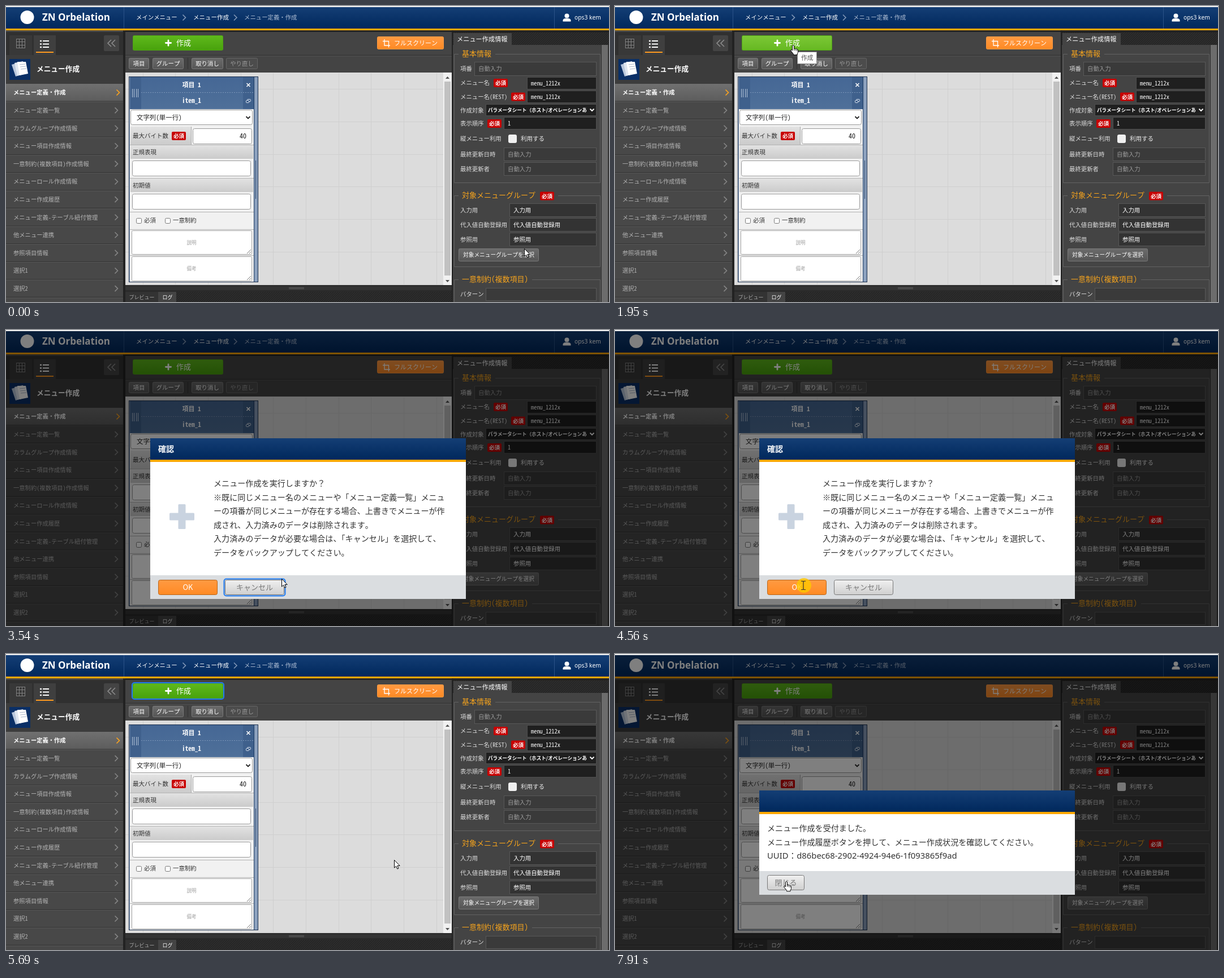
Animation of 1066x525 px, one loop 8000 ms. Source, as an HTML page:

```html
<!DOCTYPE html>
<html lang="ja">
<head>
<meta charset="utf-8">
<title>メニュー作成</title>
<style>
html, body { margin: 0; width: 100%; height: 100%; overflow: hidden; background: #333; }
svg { display: block; width: 1066px; height: 525px; }
text { font-family: "Noto Sans Mono CJK JP", "Noto Sans CJK JP", "Noto Sans CJK", "Noto Sans", monospace; white-space: pre; }
.latin { font-family: "Noto Sans", "Noto Sans CJK JP", sans-serif; }
.narrow { font-family: "Noto Sans CJK JP", "Noto Sans CJK", sans-serif; }
</style>
</head>
<body>
<svg id="stage" viewBox="0 0 1066 525" xmlns="http://www.w3.org/2000/svg"></svg>
<script>
const LOOP = 8000;
const stage = document.getElementById('stage');

// Drawing helpers; boxes are given by their edges, text by its vertical centre.
const box = (x1, y1, x2, y2, fill, extra = '') =>
  `<rect x="${x1}" y="${y1}" width="${x2 - x1}" height="${y2 - y1}" fill="${fill}" ${extra}/>`;
const frame = (x1, y1, x2, y2, fill, stroke, r = 2) =>
  box(x1 + .5, y1 + .5, x2 - .5, y2 - .5, fill, `stroke="${stroke}" rx="${r}"`);
const text = (x, y, str, size, fill, extra = '') =>
  `<text x="${x}" y="${(y + size * .37).toFixed(2)}" font-size="${size}" fill="${fill}" ${extra}>${str}</text>`;
const line = (d, stroke, width = 1, extra = '') =>
  `<path d="${d}" fill="none" stroke="${stroke}" stroke-width="${width}" ${extra}/>`;
const MID = 'text-anchor="middle"';
const BOLD = 'font-weight="700"';
const chevron = (x, y, color, s = 5) => line(`M${x - s / 2} ${y - s}l${s} ${s}l${-s} ${s}`, color, 1.6);
const caret = (x, y, color) => line(`M${x - 3.5} ${y - 2}l3.5 3.5l3.5 -3.5`, color, 1.8);
const badge = (x, y) => box(x, y - 7.5, x + 25, y + 7.5, '#c80000', 'rx="2"') +
  text(x + 12.5, y, '必須', 9.6, '#fff', MID + ' ' + BOLD);
const plus = (x, y, r, w, fill) =>
  box(x - r, y - w / 2, x + r, y + w / 2, fill, 'rx="1.5"') + box(x - w / 2, y - r, x + w / 2, y + r, fill, 'rx="1.5"');
const grad = (id, a, b) => `<linearGradient id="${id}" x2="0" y2="1"><stop stop-color="${a}"/>` +
  `<stop offset="1" stop-color="${b}"/></linearGradient>`;

const defs = () => '<defs>' +
  grad('navy', '#143e75', '#00285c') + grad('green', '#5fb91c', '#48a20c') + grad('greenHot', '#7cc836', '#66b822') +
  grad('btn', '#6b6b6b', '#565656') + grad('active', '#707070', '#5c5c5c') + grad('head', '#456795', '#4f7099') +
  grad('row', '#e2e2e2', '#cbcbcb') + grad('light', '#f0f0f0', '#cfcfcf') + grad('orange', '#ff9a42', '#ff8a24') +
  '<pattern id="weave" width="4" height="4" patternUnits="userSpaceOnUse">' +
  box(0, 0, 4, 4, '#262626') + line('M-1 1l2-2M0 4l4-4M3 5l2-2', '#333') + '</pattern></defs>';

function header() {
  return box(0, 0, 1066, 2, '#f2f2f2') + box(0, 2, 1066, 40, 'url(#navy)') + box(0, 40, 1066, 43.5, '#ffa800') +
    box(208, 2, 209, 40, '#2b5288') + box(969, 2, 970, 40, '#2b5288') +
    '<circle cx="37.500" cy="20" r="12" fill="#fff"/>' +
    text(64, 20, 'ZN Orbelation', 17, '#fff', 'class="latin" ' + BOLD) +
    text(230, 20, 'メインメニュー', 10.4, '#fff') + chevron(315, 20.5, '#8298b8') +
    text(331, 20, 'メニュー作成', 10.5, '#fff') + chevron(405.5, 20.5, '#8298b8') +
    text(421, 20, 'メニュー定義・作成', 10.4, '#aebdd3') +
    '<circle cx="991.500" cy="17.500" r="4" fill="#fff"/><path d="M984.500 27.500v-2q0-3 4-3.500h6q4 .5 4 3.500v2z" fill="#fff"/>' +
    text(1005, 20, 'ops3 kem', 10.3, '#fff', 'class="latin"');
}

function sidebar() {
  const items = ['メニュー定義・作成', 'メニュー定義一覧', 'カラムグループ作成情報', 'メニュー項目作成情報',
    '一意制約(複数項目)作成情報', 'メニューロール作成情報', 'メニュー作成履歴', 'メニュー定義-テーブル紐付管理',
    '他メニュー連携', '参照項目情報', '選択1', '選択2'];
  let s = box(0, 43.5, 208, 525, '#484848') + box(0, 46, 208, 87, '#303030') + box(0, 87, 208, 138, '#3c3c3c') +
    box(6, 52, 46, 87, '#383838') + box(49, 52, 88, 87, '#3f3f3f') + box(53, 81, 84, 83, '#ff9a1f') +
    frame(18, 58, 34, 75, 'none', '#808080', 0) +
    line('M18 63.500H34M18 69.500H34M23.500 58V75M28.500 58V75', '#808080');
  for (const y of [62, 67.5, 73]) s += box(60, y - 1.2, 63, y + 1.2, '#fff') + box(65, y - 1, 76, y + 1, '#fff');
  s += box(173, 52, 200, 80, '#444', 'rx="2"') + line('M186 60l-6 6l6 6M193 60l-6 6l6 6', '#8f8f8f', 1.5) +
    box(6, 94, 43, 131, '#0a2f66') +
    '<path d="M10 104l14-4l7 20l-14 5z" fill="#b9c7dc"/><path d="M15 101l15-3l5 22l-15 4z" fill="#dfe6f0"/>' +
    '<path d="M20 99h15l4 21l-15 3z" fill="#fff"/>' + line('M24 104l10-1M25 108l10-1M26 112l10-1', '#a9b6ca') +
    text(54, 111.5, 'メニュー作成', 12.7, '#fff', BOLD);
  items.forEach((name, i) => {
    const y = 153.5 + i * 31.6, on = i === 0;
    if (on) s += box(0, 138, 208, 169, 'url(#active)');
    s += box(0, y + 15, 208, y + 16, '#2e2e2e') + box(0, y + 16, 208, y + 17, '#5a5a5a') +
      text(13, y, name, 10.3, on ? '#fff' : '#b4b4b4', on ? BOLD : '') + chevron(on ? 198 : 195, y, on ? '#ffa41c' : '#858585');
  });
  return s + box(207, 43.5, 211, 525, '#222');
}

function toolbar() {
  const button = (x1, x2, label, off) => frame(x1, 92, x2, 112, off ? '#4c4c4c' : 'url(#btn)', off ? '#666' : '#7a7a7a') +
    text((x1 + x2) / 2, 102, label, 10.4, off ? '#999' : '#fff', MID);
  return box(211, 43.5, 788, 525, '#444') + box(211, 43.5, 788, 46, '#222') + box(211, 87, 788, 88, '#2c2c2c') +
    box(211, 88, 788, 89, '#565656') + box(321, 92, 322, 112, '#333') +
    button(217, 253, '項目') + button(259, 314, 'グループ') + button(328, 384, '取り消し') + button(389, 445, 'やり直し', true) +
    frame(656, 54, 774, 77, 'url(#orange)', '#ff9a42') +
    line('M669 59v11h10M666 62.500h10.500v11', '#fff', 1.3) + text(686, 66, 'フルスクリーン', 11, '#fff');
}

function canvas() {
  let s = box(211, 118, 788, 495, '#dcdcdc'), d = '';
  for (let x = 241.5; x < 773; x += 57.7) d += `M${Math.round(x) + .5} 119V495`;
  for (let y = 147; y < 495; y += 57.8) d += `M211 ${Math.round(y) + .5}H773`;
  s += line(d, '#cfcfcf') + box(773, 118, 788, 495, '#f1f1f1') + box(775, 134, 786, 478, '#c1c1c1') +
    '<path d="M777 129l3.500-4l3.500 4zM777 486l3.500 4l3.500-4z" fill="#505050"/>';
  return s + box(211, 495, 788, 525, '#2a2a2a') + box(211, 497, 788, 504, '#343434') +
    line('M500 499.500H527M500 501.500H527', '#5c5c5c') + box(301, 507, 788, 525, 'url(#weave)') +
    box(211, 507, 269, 525, '#333') + box(269, 507, 301, 525, '#444') +
    text(240, 517, 'プレビュー', 9, '#aaa', MID) + text(285.5, 517, 'ログ', 9, '#fff', MID);
}

function card() {
  const band = (y1, y2, label) => box(220, y1, 437, y2, 'url(#row)') + text(224, (y1 + y2) / 2, label, 10.5, '#333');
  const input = (x1, y1, x2, y2) => frame(x1, y1, x2, y2, '#fff', '#999', 3);
  const area = (y1, y2, label) => frame(222, y1, 435, y2, '#fff', '#a6a6a6') +
    text(328, (y1 + y2) / 2, label, 8.6, '#bdbdbd', MID + ' ' + BOLD) +
    line(`M426 ${y2 - 2}l7-7M430 ${y2 - 2}l3-3`, '#777');
  const check = (x, label) => frame(x, 376, x + 10, 386, '#fff', '#777') + text(x + 14, 380.5, label, 10.4, '#333');
  return frame(217, 125, 446, 490, '#8ba0bd', '#1b2f4d', 0) + box(219, 126, 438, 183, 'url(#head)') +
    box(219, 126, 239, 183, '#3f608c') + box(419, 126, 438, 183, '#3f608c') +
    line('M239 153.500H438', '#7c96b8', 1, 'stroke-dasharray="2 2"') +
    line('M223.500 147V162M226.500 147V162M230.500 147V162M233.500 147V162', '#b5c5da') +
    text(328, 140, '項目 1', 11, '#fff', MID + ' ' + BOLD) + text(328, 168, 'item_1', 11.3, '#fff', MID + ' ' + BOLD) +
    line('M425.500 137l6 6m0-6l-6 6', '#fff', 1.6) + frame(426, 165, 433, 170, 'none', '#dfe7f2', 1) +
    frame(424, 167, 430, 172, '#3f608c', '#dfe7f2', 1) +
    box(219, 183, 438, 489, '#f1f1f1') + box(438, 126, 439, 489, '#1b3960') + line('M441.500 274V342', '#2a4468') +
    input(220, 184, 436, 211) + text(231, 198, '文字列(単一行)', 11.4, '#222') + caret(428, 198, '#222') +
    box(220, 214, 327, 246, 'url(#row)') + box(327, 214, 328, 246, '#aaa') + text(224, 230, '最大バイト数', 10.5, '#333') +
    badge(293, 230.5) + input(330, 217, 435, 245) + text(425, 231, '40', 12, '#111', 'text-anchor="end"') +
    band(247, 271, '正規表現') + input(223, 274, 433, 302) + band(306, 330, '初期値') + input(223, 333, 433, 361) +
    line('M219 246.500H438M219 305.500H438M219 365.500H438M219 396.500H438M219 442.500H438', '#b4b4b4') +
    check(230, '必須') + check(281, '一意制約') + area(398, 441, '説明') + area(444, 488, '備考');
}

function panel() {
  const label = (y, s) => text(803, y, s, 10.4, '#ddd');
  const field = (x, y1, y2, value = '', look = 'dark') => {
    const [fill, stroke, ink] = { dark: ['#1f1f1f', '#4e4e4e', '#fff'], auto: ['#3a3a3a', '#585858', '#989898'],
      view: ['#333', '#565656', '#fff'] }[look];
    return frame(x, y1, 1044, y2, fill, stroke, 0) + text(x + 7, (y1 + y2) / 2, value, 10.4, ink);
  };
  const group = (y, end, title, gap) => line(`M800 ${y}.5H792.5V${end}.5H1050.5V${y}.5H${gap}`, '#636363') +
    text(806, y - .5, title, 13, '#f5a31d');
  let s = box(788, 43.5, 1066, 525, '#444') + box(788, 43.5, 1066, 69, 'url(#weave)') + box(788, 43.5, 1066, 47, '#222') +
    box(788, 43.5, 790, 525, '#222') + box(791, 48, 894, 70, '#444') + text(797, 58.5, 'メニュー作成情報', 11.2, '#fff') +
    box(1052, 69, 1066, 525, '#333') + box(1053, 69, 1064, 525, '#6c6c6c');
  s += group(85, 313, '基本情報', 865) +
    label(111, '項番') + field(828, 99, 124, '自動入力', 'auto') +
    label(136, 'メニュー名') + badge(862, 136.5) + field(921, 126, 148, 'menu_1212x') +
    label(161, 'メニュー名(REST)') + badge(893, 161) + field(921, 150, 172, 'menu_1212x') +
    label(185, '作成対象') + field(848, 174, 195) +
    text(852, 185, 'パラメータシート（ホスト/オペレーションあ', 8.6, '#fff', 'class="narrow" ' + BOLD) + caret(1036, 184.5, '#fff') +
    label(208, '表示順序') + badge(851, 208.5) + field(880, 197, 219, '1') +
    label(235, '縦メニュー利用') + box(888, 228, 903, 243, '#f0f0f0', 'rx="3"') + text(910, 235, '利用する', 10.5, '#eee') +
    label(263, '最終更新日時') + field(880, 251, 275, '自動入力', 'auto') +
    label(289, '最終更新者') + field(880, 277, 301, '自動入力', 'auto');
  s += group(336, 462, '対象メニューグループ', 976) + badge(944, 337);
  ['入力用', '代入値自動登録用', '参照用'].forEach((name, i) => {
    s += label(362 + i * 26, name) + field(890, 350 + i * 26, 374 + i * 26, name, 'view');
  });
  return s + frame(800, 430, 942, 453, 'url(#btn)', '#7a7a7a') + text(871, 441.5, '対象メニューグループを選択', 9.7, '#fff', MID) +
    group(485, 540, '一意制約(複数項目)', 930) + label(511, 'パターン') + field(848, 500, 523, '', 'auto');
}

const createButton = hot => frame(224, 52, 384, 79, `url(#${hot ? 'greenHot' : 'green'})`, '#4f9f17') +
  plus(287, 65.5, 6, 2.8, '#fff') + text(301, 65.5, '作成', 13, '#fff');
const ring = (x1, y1, x2, y2) => box(x1, y1, x2, y2, 'none', 'rx="4" stroke="#1f7bf2" stroke-width="2"');

// Dialogs are drawn at full size and scaled about the middle of the stage.
const dialog = (top, bottom, scale, content) =>
  `<g transform="translate(534 334.5) scale(${scale}) translate(-534 -334.5)">` +
  box(255, top, 813, bottom, '#fff') + box(255, top, 813, top + 38, 'url(#navy)') + box(255, top + 38, 813, top + 42, '#ffa800') +
  box(255, bottom - 42, 813, bottom, '#dadde0') + content + '</g>';
const dialogButton = (x1, y1, x2, y2, label, fill, ink, stroke) => frame(x1, y1, x2, y2, fill, stroke, 3) +
  text((x1 + x2) / 2, (y1 + y2) / 2, label, 13, ink, MID + ' class="narrow"');

function confirmDialog(scale, ready, focus) {
  const lines = ['メニュー作成を実行しますか？', '※既に同じメニュー名のメニューや「メニュー定義一覧」メニュ',
    'ーの項番が同じメニューが存在する場合、上書きでメニューが作', '成され、入力済みのデータは削除されます。',
    '入力済みのデータが必要な場合は、「キャンセル」を選択して、', 'データをバックアップしてください。'];
  return dialog(192, 477, scale, text(269, 210.5, '確認', 14, '#fff', BOLD) + plus(311, 331, 22, 13, '#c9d3e0') +
    lines.map((s, i) => text(367, 272 + i * 24.5, s, 14.1, '#333')).join('') +
    (ready ? dialogButton(269, 443, 374, 470, 'OK', 'url(#orange)', '#fff', '#b8651a')
      : dialogButton(269, 443, 374, 470, 'OK', '#d5d7d9', '#b9bbbd', '#d0d2d4')) +
    dialogButton(387, 443, 492, 470, 'キャンセル', 'url(#light)', '#777', '#777') +
    (focus ? ring(385.5, 441.5, 493.5, 471.5) : ''));
}

function acceptedDialog(scale, ready, focus) {
  return dialog(242, 427, scale, text(269, 309, 'メニュー作成を受付ました。', 14.1, '#333') +
    text(269, 333.5, 'メニュー作成履歴ボタンを押して、メニュー作成状況を確認してください。', 14.1, '#333') +
    text(269, 358, 'UUID：d86bec68-2902-4924-94e6-1f093865f9ad', 14.8, '#333', 'class="latin"') +
    dialogButton(269, 392, 335, 419, '閉じる', 'url(#light)', ready ? '#777' : '#999', '#777') +
    (focus ? ring(267.5, 390.5, 336.5, 420.5) : ''));
}

const pointers = {
  arrow: '<path d="M.5.500V14.200L3.600 11.300L5.800 16.200L8 15.200L5.900 10.500H10.200Z" fill="#fff" stroke="#000"/>',
  hand: '<path d="M-1.500 1.500q1.500-2 3 0v5.500q1.500-1 2.500.3q1.500-.8 2.500.5q2-.5 2 1.700v3q0 2-1.500 3.500v1.800h-6.500v-1.500' +
    'l-5-6.300q0-2 2-1.200l1 1.200z" fill="#fff" stroke="#000"/>' + line('M1.500 7v3M4 8v2.500M6.500 8.500v2.500', '#000', .8),
  beam: line('M-4-7.500h3l1 1l1-1h3M0-6.500V6.500M-4 7.500h3l1-1l1 1h3', '#333', 1.2)
};

// Stepped pointer travel: start, end, number of positions, from, bend, to.
const moves = [
  [70, 870, 12, [916, 430], [610, 260], [306, 100]],
  [920, 1640, 12, [306, 100], [307, 88], [315, 69]],
  [3170, 3930, 12, [314, 69], [650, 620], [333, 453]],
  [5250, 5690, 8, [333, 453], [480, 505], [686, 365]],
  [7250, 7910, 10, [686, 365], [500, 395], [303, 403]]
];

function pointerAt(t) {
  let pos = moves[0][3];
  for (const [start, end, n, a, b, c] of moves) {
    if (t < start) break;
    const k = Math.min(n, Math.floor((t - start) / (end - start) * (n - 1) + 1e-6) + 1) / n;
    const e = k * k * (3 - 2 * k);
    pos = a.map((v, i) => v * (1 - e) ** 2 + 2 * b[i] * e * (1 - e) + c[i] * e * e);
  }
  return pos;
}

function pointerKind(t, [x, y]) {
  const over = (x1, y1, x2, y2) => x >= x1 && x <= x2 && y >= y1 && y <= y2;
  if (t < 2640) return over(224, 52, 384, 79) ? 'hand' : 'arrow';
  if (t < 4400) return t > 3170 && (over(269, 443, 374, 470) || over(387, 443, 492, 470)) ? 'hand' : 'arrow';
  if (t < 6710) return over(222, 444, 435, 488) ? 'beam' : 'arrow';
  return over(269, 392, 335, 419) ? 'hand' : 'arrow';
}

stage.innerHTML = defs() + header() + sidebar() + toolbar() + canvas() + card() + panel() + '<g id="live"></g>';
const live = document.getElementById('live');
let shown = '';

function draw(t) {
  const pos = pointerAt(t), kind = pointerKind(t, pos);
  const asking = t >= 2640 && t < 4640, accepted = t >= 6710;
  let s = createButton(t < 2640 && kind === 'hand');
  if (t >= 4640 && !accepted) s += ring(223, 51, 385, 80);
  if (t >= 1950 && t < 2510) s += frame(322, 81, 357, 103, '#fff', '#888', 0) + text(329, 92, '作成', 10.8, '#555');
  if (asking || accepted) s += box(0, 2, 1066, 525, '#000', 'opacity=".5"');
  if (asking) s += confirmDialog(t < 2710 ? .767 : t < 2780 ? .95 : 1, t >= 2780, t < 4040);
  if (accepted) s += acceptedDialog(t < 6780 ? .767 : 1, t >= 6780, kind !== 'hand');
  if (t >= 4040 && t < 4640) s += '<circle cx="334" cy="453" r="13" fill="#ffc800" opacity=".8"/>';
  s += `<g transform="translate(${Math.round(pos[0])} ${Math.round(pos[1])})">${pointers[kind]}</g>`;
  if (s !== shown) live.innerHTML = shown = s;
}

const began = performance.now();
function tick() {
  draw((performance.now() - began) % LOOP);
  requestAnimationFrame(tick);
}
draw(0);
requestAnimationFrame(tick);
</script>
</body>
</html>
```
